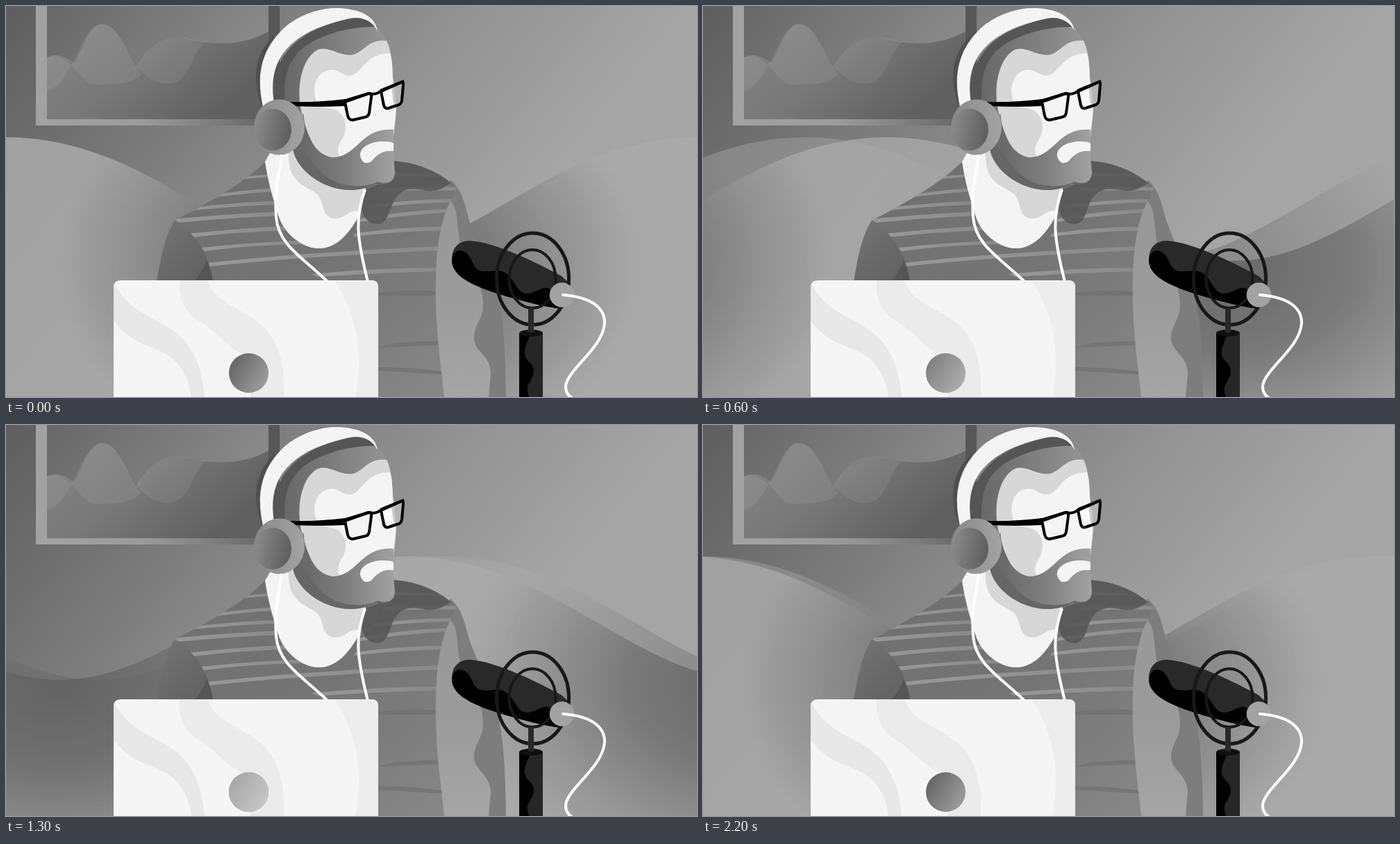
Write an HTML page that moves like this. It is 995 by 563 pixels and loops after 2250 ms.

```html
<!DOCTYPE html>
<html lang="en">
<head>
<meta charset="utf-8">
<title>Podcast host</title>
<style>
  html, body { margin: 0; width: 100%; height: 100%; overflow: hidden; background: #909090; }
  svg { display: block; width: 995px; height: 563px; }
  .back { opacity: .4; }
  .front { opacity: .74; }
  .slide { animation: slide 2250ms linear infinite; }
  .eased { animation-timing-function: ease-in-out; }
  .glow { animation: glow 2250ms linear infinite; }
  @keyframes slide { to { transform: translateX(995px); } }
  @keyframes glow {
    0%, 20% { opacity: 0; }
    35% { opacity: .85; }
    50% { opacity: 1; }
    66% { opacity: .85; }
    82%, 100% { opacity: 0; }
  }
</style>
</head>
<body>
<svg viewBox="0 0 995 563">
  <defs>
    <linearGradient id="wall" gradientUnits="userSpaceOnUse" x1="0" y1="0" x2="585" y2="486">
      <stop offset="0" stop-color="#5e5e5e"/>
      <stop offset=".28" stop-color="#737373"/>
      <stop offset=".5" stop-color="#858585"/>
      <stop offset=".7" stop-color="#949494"/>
      <stop offset="1" stop-color="#a5a5a5"/>
    </linearGradient>
    <radialGradient id="trough">
      <stop offset="0" stop-color="#5e5e5e"/>
      <stop offset=".4" stop-color="#6f6f6f"/>
      <stop offset=".65" stop-color="#8a8a8a"/>
      <stop offset="1" stop-color="#acacac"/>
    </radialGradient>
    <linearGradient id="sky" x2="1" y2=".4">
      <stop stop-color="#686868"/><stop offset="1" stop-color="#8c8c8c"/>
    </linearGradient>
    <linearGradient id="hills" x2="1" y2=".5">
      <stop stop-color="#868686"/><stop offset=".5" stop-color="#787878"/><stop offset="1" stop-color="#606060"/>
    </linearGradient>
    <linearGradient id="frame" x2="1">
      <stop stop-color="#a2a2a2"/><stop offset=".45" stop-color="#9a9a9a"/><stop offset="1" stop-color="#626262"/>
    </linearGradient>
    <linearGradient id="shirt" x2="1" y2="1">
      <stop stop-color="#6f6f6f"/><stop offset=".5" stop-color="#747474"/><stop offset="1" stop-color="#888"/>
    </linearGradient>
    <linearGradient id="stripe" x2="1">
      <stop stop-color="#989898"/><stop offset="1" stop-color="#8a8a8a"/>
    </linearGradient>
    <linearGradient id="sleeve" x2="1" y2="1">
      <stop stop-color="#747474"/><stop offset="1" stop-color="#5f5f5f"/>
    </linearGradient>
    <linearGradient id="arm" x2="0" y2="1">
      <stop stop-color="#989898"/><stop offset=".5" stop-color="#9b9b9b"/><stop offset="1" stop-color="#a5a5a5"/>
    </linearGradient>
    <linearGradient id="hair" x2="1">
      <stop stop-color="#686868"/><stop offset="1" stop-color="#949494"/>
    </linearGradient>
    <linearGradient id="beard" x2="1">
      <stop stop-color="#646464"/><stop offset=".5" stop-color="#7c7c7c"/><stop offset="1" stop-color="#a2a2a2"/>
    </linearGradient>
    <linearGradient id="cup" x2="1">
      <stop stop-color="#888"/><stop offset="1" stop-color="#a3a3a3"/>
    </linearGradient>
    <linearGradient id="disc" x2="1" y2=".2">
      <stop stop-color="#8e8e8e"/><stop offset="1" stop-color="#606060"/>
    </linearGradient>
    <linearGradient id="badge" x1="0" y1=".2" x2="1" y2=".8">
      <stop stop-color="#626262"/><stop offset="1" stop-color="#a0a0a0"/>
    </linearGradient>
    <linearGradient id="badgeLit" x1="0" y1=".2" x2="1" y2=".8">
      <stop stop-color="#acacac"/><stop offset="1" stop-color="#cbcbcb"/>
    </linearGradient>
    <clipPath id="crest">
      <path d="M-995 189C-785 189-665 367-498 367S-210 189 0 189 330 367 497 367 785 189 995 189V570H-995Z"/>
    </clipPath>
    <clipPath id="torso">
      <path id="body" d="M374 223C352 246 318 270 243 309C229 330 223 362 217 400V563H640L622 400C620 350 626 310 640 281L649 262C625 239 594 226 558 223Z"/>
    </clipPath>
    <clipPath id="lid"><path d="M155 563V405Q155 395 165 395H527Q536 395 536 405V563Z"/></clipPath>
    <g id="swell" clip-path="url(#crest)">
      <path fill="#acacac" d="M-995 180H995V570H-995Z"/>
      <g fill="url(#trough)">
        <ellipse cx="-498" cy="372" rx="425" ry="310"/>
        <ellipse cx="497" cy="372" rx="425" ry="310"/>
      </g>
    </g>
  </defs>

  <rect width="995" height="563" fill="url(#wall)"/>

  <!-- Picture on the wall -->
  <path fill="url(#frame)" d="M43 0H394V172H43Z"/>
  <path fill="#575757" d="M378 0H394V163H378Z"/>
  <path fill="url(#sky)" d="M59 0H378V163H59Z"/>
  <path fill="url(#hills)" d="M59 74C76 66 90 76 98 82C110 66 118 26 138 26C164 26 175 74 192 88C206 62 222 44 250 45C290 54 330 62 378 37V163H59Z"/>
  <g fill="#fff" fill-opacity=".07">
    <path d="M59 122C95 116 108 26 138 26C166 26 180 88 195 97C182 116 145 112 128 114C110 112 102 84 72 71L59 74Z"/>
    <path d="M187 88C205 60 222 44 250 45C270 46 278 53 290 50C266 65 268 108 237 112C217 114 206 104 187 88Z"/>
  </g>

  <g class="back"><g class="slide eased"><use href="#swell"/></g></g>
  <g class="front"><g class="slide"><use href="#swell"/></g></g>

  <!-- Shirt and arms -->
  <path fill="#7d7d7d" d="M640 250C656 264 660 282 667 309C681 347 699 380 708 418C718 455 719 510 720 563H620L622 300Z"/>
  <use href="#body" fill="url(#shirt)"/>
  <g clip-path="url(#torso)">
    <g fill="url(#stripe)">
      <path d="M340 246L382 242V246L330 250Z"/>
      <path d="M300 272Q340 265 390 262V267Q350 269 296 276Z"/>
      <path d="M270 290Q340 282 392 281V286Q340 287 262 295Z"/>
      <path d="M240 307Q310 300 396 296V302Q320 305 250 312Z"/>
      <path d="M262 328Q335 320 402 317V323Q340 325 268 333Z"/>
      <path d="M281 348Q360 340 418 338L426 343Q360 344 285 353Z"/>
      <path d="M290 370Q410 356 626 346V352Q420 361 293 375Z"/>
      <path d="M440 386Q530 377 624 377V382Q540 384 450 390Z"/>
      <path d="M504 327Q570 318 630 318V323Q570 324 500 332Z"/>
      <path d="M511 306Q580 294 640 292V297Q570 301 510 311Z"/>
      <path d="M560 240L630 243L642 249Q600 244 560 245Z"/>
      <path d="M545 262Q600 259 652 261V266Q600 264 540 267Z"/>
      <path d="M530 286Q590 278 645 278V283Q590 283 525 291Z"/>
    </g>
    <g fill="#6f6f6f" fill-opacity=".65">
      <path d="M536 413Q590 407 624 411V417H536Z"/>
      <path d="M560 485L627 482V488L536 492Z"/>
      <path d="M536 520Q590 520 632 527V531L536 525Z"/>
    </g>
    <path fill="#565656" fill-opacity=".85" d="M516 264C506 291 515 314 535 314C557 313 549 277 573 266C595 258 604 272 627 263L645 253C620 233 590 225 558 223V250Z"/>
  </g>
  <path fill="url(#sleeve)" d="M243 309C269 325 291 351 298 396H217C223 362 229 330 243 309Z"/>
  <path fill="#555" d="M289 366Q296 381 298 396H271Q285 381 289 366Z"/>
  <path fill="url(#arm)" d="M640 281C653 294 648 320 655 346C661 374 687 391 687 430C687 452 673 460 674 480C676 499 697 502 698 529L695 563H631C625 509 617 450 619 390C620 345 626 308 640 281Z"/>

  <!-- Neck -->
  <path fill="#f4f4f4" d="M390 195L373 224C378 258 386 282 394 307C404 331 428 349 451 349C478 349 496 324 507 304L517 262L520 195Z"/>
  <path fill="#d7d7d7" d="M407 211C405 255 432 259 447 270C460 281 452 306 475 306C491 305 492 293 510 295L518 262L480 245L430 205Z"/>

  <!-- Head -->
  <path fill="#555" d="M384 143C380 90 403 55 446 34C474 21 500 16 518 17Q533 27 548 51L500 150L430 230C414 210 405 180 400 150Z"/>
  <path fill="url(#hair)" d="M402 148C396 92 413 63 450 47C482 33 507 30 535 30Q545 43 550 54L540 90L470 180L426 170Z"/>
  <path fill="#d7d7d7" d="M425 151C417 109 429 75 447 64C464 55 480 74 500 70C518 64 522 47 548 50C554 61 557 85 557 103L562 150L558 190L468 225C442 211 432 180 425 151Z"/>
  <path fill="#f4f4f4" d="M447 137C439 114 449 92 469 92C481 92 483 101 497 100C514 96 516 69 553 68C557 80 556 93 557 105C561 125 564 150 558 180L520 203L483 218C474 212 478 201 486 188C492 173 489 160 478 151C466 145 452 149 447 137Z"/>
  <path fill="#666" d="M412 200C414 228 440 250 464 259C487 268 514 267 530 256C548 259 559 256 560 240L480 225Z"/>
  <path fill="url(#beard)" d="M414 200L428 154C431 187 445 214 470 218C506 218 511 174 558 178V216L560 240C559 255 547 257 535 253C520 262 487 261 470 251C442 236 440 212 414 200Z"/>
  <path fill="#f4f4f4" d="M511 219C506 207 520 196 541 195C551 195 557 196 558 198V209C540 207 533 216 526 224Q515 230 511 219Z"/>

  <!-- Glasses -->
  <path fill="#fff" fill-opacity=".5" d="M541 122L571 109L569 140L548 148Z"/>
  <path fill="#a6a6a6" fill-opacity=".6" d="M555 116L571 109L569 137L563 143L558 140Z"/>
  <path d="M409 138Q450 139 489 134V144Q450 146 414 144Z"/>
  <g fill="none" stroke="#000" stroke-width="4" stroke-linejoin="round">
    <path d="M488 138L522 126Q527 125 526 131L523 154Q522 159 517 160L500 164Q494 165 492 158Z"/>
    <path d="M540 123L569 110Q572 108 572 113L570 136Q569 142 563 143L551 147Q546 149 544 143Z"/>
    <path d="M486 137L522 126Q534 129 541 121L573 108"/>
  </g>

  <!-- Headphones -->
  <path fill="#4f4f4f" d="M369 145C354 105 357 70 386 42L376 90Z"/>
  <path fill="#f4f4f4" d="M370 145C361 105 365 68 396 36C418 13 452 3 474 3C500 3 531 10 535 36C528 22 512 13 490 19C452 28 424 40 404 62C386 82 380 110 387 145Z"/>
  <ellipse cx="393.500" cy="174.500" rx="36.500" ry="40" fill="url(#cup)"/>
  <ellipse cx="384" cy="178" rx="27" ry="30" fill="url(#disc)"/>
  <g fill="none" stroke="#fff" stroke-width="4">
    <path d="M397 214C393 245 386 264 389 304C392 346 433 366 463 397"/>
    <path d="M517 264C503 304 504 330 521 397"/>
  </g>

  <!-- Laptop -->
  <g clip-path="url(#lid)">
    <path fill="#f5f5f5" d="M155 395H536V563H155Z"/>
    <path fill="#e8e8e8" d="M155 397C175 439 209 446 239 466C270 488 282 520 286 563H267C262 529 247 507 220 496C193 485 174 479 155 453Z"/>
    <path fill="#ebebeb" d="M250 395H290C302 432 348 435 376 467C395 489 402 525 400 563H352V505C321 498 304 467 275 452Q247 433 250 395Z"/>
    <path fill="#ededed" d="M473 395H536V563H503C515 500 506 445 473 395Z"/>
    <circle cx="349.500" cy="528.500" r="28.500" fill="url(#badge)"/>
    <circle class="glow" cx="349.500" cy="528.500" r="28.500" fill="url(#badgeLit)"/>
  </g>

  <!-- Microphone -->
  <path fill="#292929" d="M642 368C641 350 650 338 668 338C705 340 765 370 800 389L812 400L800 436C770 433 715 417 690 408C662 397 644 386 642 368Z"/>
  <path d="M642 368C643 350 655 350 662 355C674 364 670 381 688 382C704 383 712 377 724 388C735 401 738 415 752 414C768 412 778 398 786 412Q788 427 800 436C770 433 715 417 690 408C662 397 644 386 642 368Z"/>
  <path fill="#292929" d="M752 435H760V472H752Z"/>
  <g fill="none" stroke="#181818">
    <ellipse cx="758.500" cy="393" rx="52" ry="66" stroke-width="5"/>
    <ellipse cx="758" cy="393" rx="33.500" ry="42" stroke-width="4"/>
  </g>
  <path fill="#262626" d="M739 471H773V563H739Z"/>
  <path d="M739 471H756C748 490 742 500 752 511C766 524 759 534 752 545Q749 552 753 563H739Z"/>
  <ellipse cx="756" cy="471" rx="17" ry="5" fill="#101010"/>
  <path fill="#292929" d="M752 435H760V470H752Z"/>
  <circle cx="800.500" cy="416" r="17.800" fill="#a2a2a2"/>
  <path fill="none" stroke="#fff" stroke-width="4" stroke-linecap="round" d="M802 416C842 419 862 434 862 456C860 492 811 521 806 546Q805 559 816 565"/>
</svg>
</body>
</html>
```
